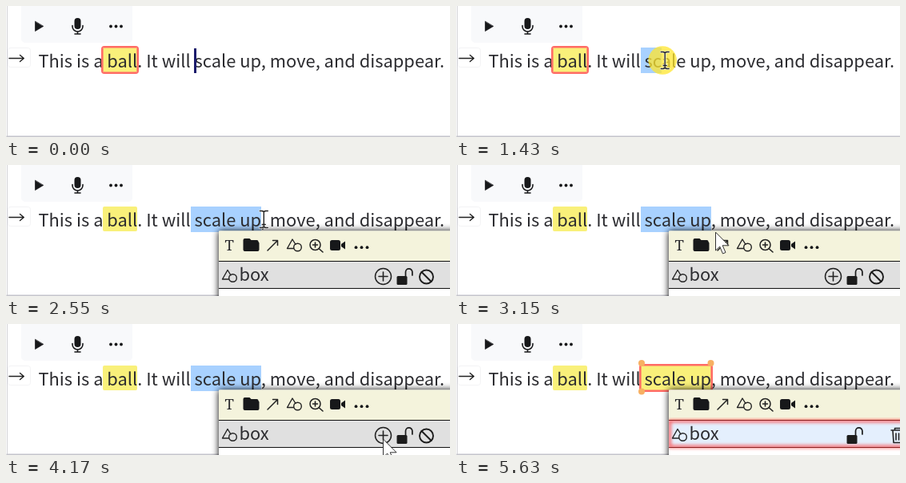
Animation of 555x164 px, one loop 5830 ms. Source, as an HTML page:

```html
<!DOCTYPE html>
<html lang="en">
<head>
<meta charset="utf-8">
<title>Select text</title>
<style>
html, body { margin: 0; width: 555px; height: 164px; overflow: hidden; background: #fff; }
body { position: relative; color: #2b2b2f; font: 21.86px/32px "Noto Sans CJK SC", "Noto Sans CJK JP", "Noto Sans CJK", sans-serif; }
body > * { position: absolute; }
#line { left: 40.5px; top: 52px; white-space: pre; }
#sel { top: 52px; height: 31.5px; background: #a8d1ff; }
#caret { left: 235px; top: 53px; width: 3px; height: 31px; background: #1c1c6c; }
.mark { position: relative; border-radius: 2px; background: #f9f07a; }
.mark.on { box-shadow: 0 0 0 2px #ff6b66, inset 0 0 0 .6px #ff6b66; }
svg { left: 0; top: 0; }
svg text { font: inherit; fill: #2b2b2f; }
#popup > rect:first-child { filter: drop-shadow(0 0 4.5px #000); }
</style>
</head>
<body>
<div id="sel"></div>
<div id="line">This is a<span id="ball" class="mark"> ball</span>. It will<span id="target"> scale up</span>, move, and disappear.</div>
<div id="caret"></div>
<svg width="555" height="164" fill="none" stroke-linecap="round" stroke-linejoin="round">
  <defs>
    <filter id="blur" x="-10%" y="-50%" width="120%" height="200%"><feGaussianBlur stdDeviation="2"/></filter>
    <clipPath id="wipe"><rect id="wipeRect" y="117" width="300" height="45"/></clipPath>
    <g id="shapes" stroke="#222" stroke-width="1.4">
      <path d="M8.5 13H.5L7 1.5 11 8"/><circle cx="13.5" cy="11.500" r="4.800"/>
    </g>
    <g id="lock">
      <rect x="488.500" y="139" width="13" height="11" rx="1.5" fill="#1c1c1c"/>
      <path d="M499.500 139V134a4.200 4.200 0 0 1 8.400 0V138" stroke="#1c1c1c" stroke-width="1.700"/>
    </g>
    <path id="beamPath" d="M-5-10.500H-2L0-9.500 2-10.500H5M0-9.500V9.500M-5 10.500H-2L0 9.500 2 10.500H5M-2 6.500H2"/>
  </defs>

  <path d="M1.5 0V163" stroke="#d2d2d6"/>
  <path d="M1 163.2H555" stroke="#c4c4cb" stroke-width="1.6"/>
  <rect x="2.5" y="52.5" width="28" height="24" rx="3" stroke="#f3f3f5"/>
  <path d="M4 65.500H22M17.500 61.500l4.800 4-4.800 4" stroke="#222" stroke-width="1.400"/>

  <rect x="19" y="-8" width="139" height="54" rx="5" fill="#f8f9fb"/>
  <g fill="#17181a">
    <path d="M36.500 19.500V31.500L46.500 25.500Z" stroke="#17181a" stroke-width=".7"/>
    <rect x="85.500" y="15" width="8" height="14" rx="4"/>
    <path d="M83 24.500v1a6.500 6.500 0 0 0 13 0v-1M89.500 32.500V35M86 35h7" fill="none" stroke="#17181a" stroke-width="1.600"/>
    <circle cx="131" cy="25.500" r="1.900"/><circle cx="137.500" cy="25.500" r="1.900"/><circle cx="144" cy="25.500" r="1.900"/>
  </g>

  <g id="handles" fill="#f7b062">
    <circle cx="232" cy="49" r="4"/><circle cx="318.500" cy="49" r="4"/><circle cx="232" cy="84.500" r="4"/>
  </g>

  <g id="popup">
    <rect x="266" y="82.500" width="310" height="100" rx="2" fill="#fff"/>
    <rect x="266" y="82.500" width="310" height="38" fill="#f4f3dc"/>
    <rect id="hover" x="320" y="87" width="26" height="26" rx="3" fill="#e5e4cf"/>
    <text x="273.500" y="107" style="font:18.500px 'Noto Serif',serif">T</text>
    <path d="M296.500 94q0-2 2-2h6l2 2h7q2 0 2 2l1 1.500v8.500q0 2-2 2h-16q-2 0-2-2Z" fill="#17181a"/>
    <path d="M327 107L339 95M333.500 94.500H339.500V100.500" stroke="#222" stroke-width="1.500"/>
    <use href="#shapes" x="351" y="91.500"/>
    <path d="M391.500 105l4.500 4M386.500 97v6M383.500 100h6" stroke="#222" stroke-width="1.600"/>
    <circle cx="386.500" cy="100" r="6.500" stroke="#222" stroke-width="1.500"/>
    <rect x="405" y="94" width="13" height="13" rx="2.500" fill="#17181a"/>
    <path d="M419 99l5-3.500v10l-5-3.500Z" fill="#17181a"/>
    <g fill="#17181a"><circle cx="437.500" cy="103.200" r="1.900"/><circle cx="444.500" cy="103.200" r="1.900"/><circle cx="451.500" cy="103.200" r="1.900"/></g>

    <rect x="266" y="120.500" width="310" height="34" fill="#e0e0e0"/>
    <path d="M266 120.500H576M266 154.500H576" stroke="#111" stroke-linecap="butt"/>
    <circle cx="471.500" cy="139.500" r="10" stroke="#222" stroke-width="1.500"/>
    <path d="M466 139.500h11M471.500 134v11" stroke="#222" stroke-width="1.600"/>
    <circle cx="525.500" cy="140" r="8.500" stroke="#1c1c1c" stroke-width="1.900"/>
    <path d="M519.500 134l12 12" stroke="#1c1c1c" stroke-width="1.900"/>

    <g clip-path="url(#wipe)">
      <rect x="266" y="121" width="310" height="33" fill="#e4effd"/>
      <rect x="267" y="121.500" width="310" height="32" stroke="#f44" stroke-width="3.200" filter="url(#blur)"/>
      <path d="M266 120.500H576M266 154.500H576" stroke="#8c2020" stroke-linecap="butt"/>
      <path d="M544 133h13M546 133.500l1 15h10M548.500 133v-2.500h6M550 137v8M553.500 137v8" stroke="#222" stroke-width="1.600"/>
    </g>
    <use href="#lock"/>
    <use href="#shapes" x="270" y="130"/>
    <text x="291.500" y="145">box</text>
  </g>

  <circle id="halo" r="17.800" cy="68" fill="#ffe62e" fill-opacity=".75"/>
  <g id="cursor">
    <g id="beam">
      <use href="#beamPath" stroke="#fff" stroke-width="2.600"/>
      <use href="#beamPath" stroke="#222" stroke-width="1.400"/>
    </g>
    <path id="arrow" d="M.5.500V23L5.700 18 9.500 27 13 25.500 9.200 16.800H16.700Z" fill="#fff" stroke="#333"/>
  </g>
</svg>
<script>
const $ = id => document.getElementById(id);
const show = (id, on) => { $(id).style.display = on ? '' : 'none'; };

// Time runs in ticks of 1/15 s.
const LOOP = 5830, POPUP = 38, SELECTED = 70;
const path = [ // tick, x, y
  [1, 284, 61], [5, 264, 71], [9, 252.5, 75.5], [13, 243.5, 73], [15, 243.5, 73],
  [16, 232.5, 68], [18, 232.5, 68], [26, 309, 68], [27, 315.5, 68], [32, 315.5, 68],
  [33, 322.3, 68], [42, 322.3, 68], [47, 324, 84], [51, 331, 108], [54, 367, 130],
  [60, 453, 126], [62, 471, 144], [87, 471, 144]
];

function pointer(tick) {
  const i = Math.max(1, path.findIndex(p => p[0] >= tick));
  const [a, b] = [path[i - 1], path[i]];
  const u = Math.max(0, (tick - a[0]) / (b[0] - a[0]));
  return [a[1] + (b[1] - a[1]) * u, a[2] + (b[2] - a[2]) * u];
}

// Character edges of the phrase, so the selection snaps to letters.
const phrase = $('target').firstChild;
const edges = Array.from({ length: phrase.length }, (_, i) => {
  const range = document.createRange();
  range.setStart(phrase, i);
  range.setEnd(phrase, i + 1);
  const box = range.getBoundingClientRect();
  return i ? box.right : [box.left, box.right];
}).flat();

function draw(now) {
  const tick = Math.floor((now % LOOP) * 0.015 + 0.01);
  const [x, y] = pointer(tick);
  const inPopup = y > 82;
  const selected = tick >= SELECTED;
  const dragging = tick >= 18 && tick < 35;

  show('caret', tick < 18);
  $('ball').classList.toggle('on', tick < POPUP);
  $('target').className = selected ? 'mark on' : '';
  show('handles', selected);
  show('popup', tick >= POPUP);
  show('hover', x > 320 && x < 346 && y > 87 && y < 113);
  $('wipeRect').setAttribute('x', selected ? 266 : tick >= 67 ? 486 : 600);

  const end = edges.reduce((a, b) => Math.abs(b - x) < Math.abs(a - x) ? b : a);
  const right = tick >= 33 ? edges[edges.length - 1] : end;
  show('sel', tick >= 18 && !selected);
  $('sel').style.left = edges[0] + 'px';
  $('sel').style.width = right - edges[0] + 'px';

  show('halo', dragging);
  $('halo').setAttribute('cx', x - 3);
  show('beam', !inPopup);
  show('arrow', inPopup);
  $('cursor').setAttribute('transform', `translate(${x} ${y})`);
  $('cursor').style.opacity = tick < 1 || tick > 83 ? 0 : tick === 83 ? 0.5 : 1;
}

const start = performance.now();
(function loop() {
  draw(performance.now() - start);
  requestAnimationFrame(loop);
})();
</script>
</body>
</html>
```
